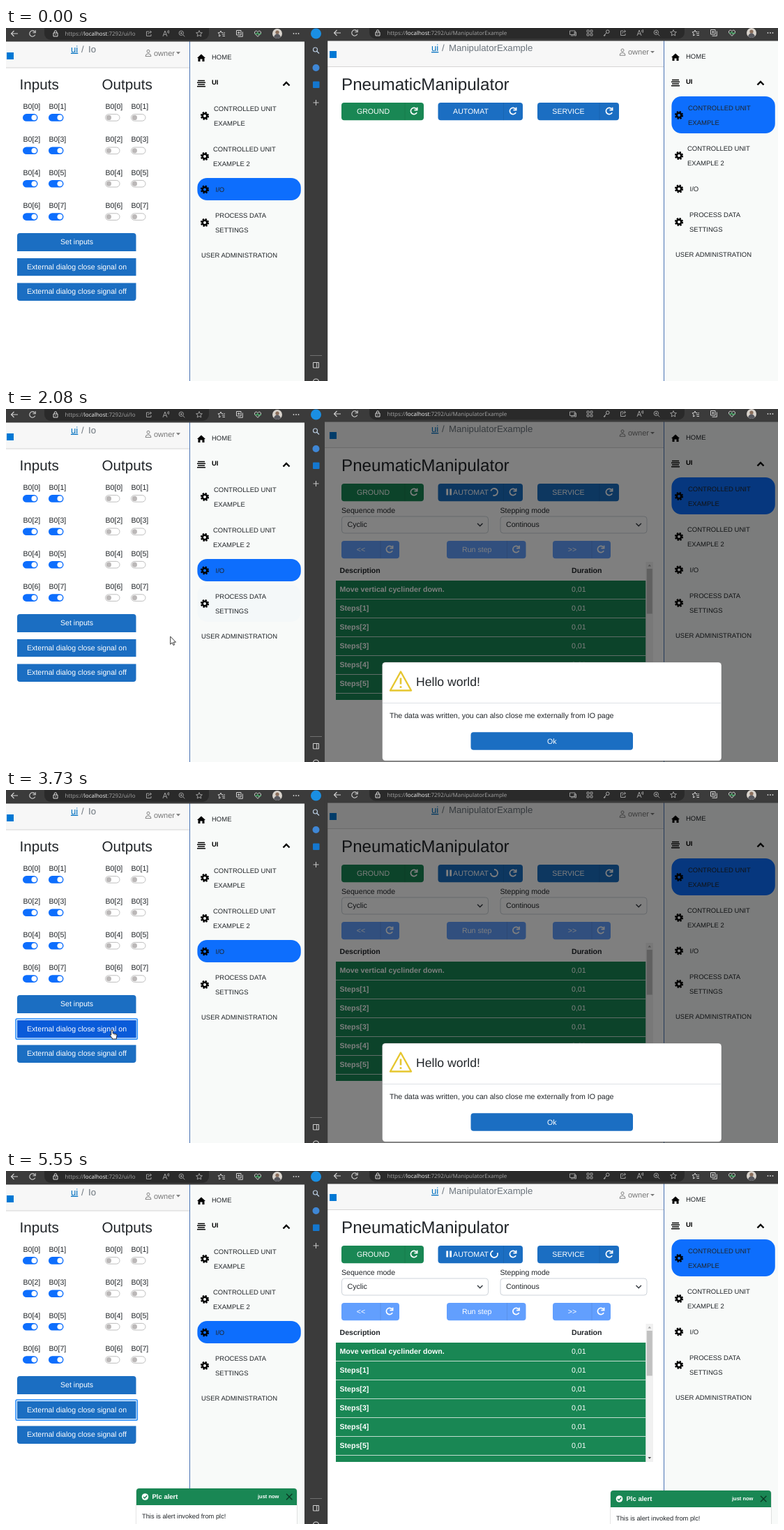
Animation of 1107 by 506 pixels, one loop 5610 ms. Source, as an HTML page:

```html
<!DOCTYPE html>
<html lang="en">
<head>
<meta charset="utf-8">
<title>Manipulator demo</title>
<style>
html, body { margin: 0; width: 100%; height: 100%; overflow: hidden; background: #fff; }
svg { display: block; width: 100vw; height: 100vh; font-family: "Liberation Sans", Arial, sans-serif; text-rendering: geometricPrecision; }
text { white-space: pre; }
.url { font-family: "Open Sans", sans-serif; }
</style>
</head>
<body>
<svg id="stage" viewBox="0 0 1107 506"></svg>
<script>
const LOOP = 5610;
const BLUE = '#1b6ec2', HOVER = '#0a5bd9', ACTIVE = '#0d6efd', PALE = '#629ffe', GREEN = '#198754', INK = '#212529', CHROME = '#3b3b3b';

// Drawing helpers
const rect = (x, y, w, h, fill, r = 0, more = '') =>
  `<rect x="${x}" y="${y}" width="${w}" height="${h}" rx="${r}" fill="${fill}" ${more}/>`;
const circle = (x, y, r, fill, more = '') => `<circle cx="${x}" cy="${y}" r="${r}" fill="${fill}" ${more}/>`;
const line = (d, color, w = 1, more = '') => `<path d="${d}" fill="none" stroke="${color}" stroke-width="${w}" ${more}/>`;
const fill = (d, color, more = '') => `<path d="${d}" fill="${color}" ${more}/>`;
const text = (x, y, s, size = 10.6, color = INK, more = '') =>
  `<text x="${x}" y="${y}" font-size="${size}" fill="${color}" ${more}>${s.replace(/</g, '&lt;')}</text>`;
const mid = (x, y, s, color = '#fff') => text(x, y, s, 10.6, color, 'text-anchor="middle"');
const at = (x, y, body) => `<g transform="translate(${x} ${y})">${body}</g>`;
const group = (id, body) => `<g id="${id}">${body}</g>`;
const BOLD = 'font-weight="700"';

const refresh = (x, y, r, color, w) => at(x, y,
  line(`M${r * .82} ${-r * .57}A${r} ${r} 0 1 0 ${r * .9} ${r * .44}`, color, w) +
  line(`M${r} ${-r * 1.15}V${-r * .3}H${r * .1}`, color, w));

// Browser icons, each around 0,0
const grey = '#d2d2d2', dim = '#a9a9a9';
const star = 'M0-4.4L1.3-1.4 4.4-1.2 2 .9 2.8 4 0 2.4-2.8 4-2 .9-4.4-1.2-1.3-1.4Z';
const icons = {
  back: line('M5 0H-4.5M-.5-4L-4.5 0-.5 4', grey, 1.1),
  reload: refresh(0, 0, 4.2, grey, 1.1),
  lock: line('M-3-1H3V4H-3ZM-1.7-1V-2.5A1.7 1.7 0 0 1 1.7-2.5V-1', '#ddd') + circle(0, 1.5, .7, '#ddd'),
  share: line('M0-3H-3.5V3.5H3V1M-1 1C-1-1 0-2.3 3-2.3M1.5-4L3.6-2.3 1.5-.5', dim, .9),
  read: line('M-4 4L-1-4 2 4M-3 1.3H1M2.5-4Q3.5-2.5 2.5-1M4-5Q5.5-2.5 4 0', dim, .9),
  zoom: circle(-.7, -.7, 3.2, 'none', `stroke="${dim}" stroke-width=".9"`) + line('M1.7 1.7L4.3 4.3M-2.2-.7H.8M-.7-2.2V.8', dim, .9),
  star: line(star, dim, .9),
  faves: line('M-1-4L0-1.5 2.5-1.3M-1-4L-2.2-1.5-5-1.1-3 .9-3.5 4-1 2.6M.8 1H5M1.5 3.5H5M3.5-1.3H5', grey),
  collect: line('M-4.5-4.5H2V2H-4.5ZM4.3-2.5V4.3H-2.5M-1.2-3V.5M-3-1.2H.6', grey),
  heart: line('M0 4.4L-4 .3C-6-3.2-1.8-5.4 0-2.4 1.8-5.4 6-3.2 4 .3Z', grey) + line('M-4 .3H-1.5L-.3-1.5 1 1.5 2 .3H5', '#4caf6b', 1.2),
  dots: [-3.5, 0, 3.5].map(x => circle(x, 0, .9, grey)).join(''),
  user: circle(0, 0, 7, '#d9d4cd') + circle(0, -1.8, 2.6, '#8b6f5c') + fill('M-4.8 5A4.8 4.4 0 0 1 4.8 5 7 7 0 0 1-4.8 5Z', '#57585e'),
  device: line('M-4.5-3H3V2.5H-4.5ZM-3 4H1M2-1H4.5V4H2Z', dim, .9),
  grid: line('M-4-4H-1V-1H-4ZM1-4H4V-1H1ZM-4 1H-1V4H-4ZM1 1H4V4H1Z', dim, .9),
  key: circle(1.8, -1.8, 2.3, 'none', `stroke="${dim}"`) + line('M.2-.2L-4 4H-2V2.5', dim)
};
const toolbar = (y, list) => list.split(' ').map(s => {
  const [name, x] = s.split(':');
  return at(x, y, icons[name]);
}).join('');
const url = (x, y, page) =>
  `<text class="url" x="${x}" y="${y}" font-size="8" fill="#a4a4a4">https://<tspan fill="#f4f4f4">localhost</tspan>:7292/ui/${page}</text>`;

// Page parts
function crumbs(x, y, page) {
  return text(x, y, 'ui', 13.2, '#0071c1', 'text-decoration="underline"') +
    text(x + 15, y, '/', 13.2, '#6c757d') + text(x + 25, y, page, 13.2, '#6c757d');
}
function account(x, y) {
  return circle(x + 4, y - 6.5, 2, 'none', 'stroke="#777" stroke-width=".9"') +
    line(`M${x} ${y + .8}Q${x} ${y - 3} ${x + 4} ${y - 3}T${x + 8} ${y + .8}Z`, '#777', .9) +
    text(x + 12, y, 'owner', 11, '#777') + fill(`M${x + 44} ${y - 5.5}h6l-3 3.2z`, '#777');
}
const gear = y => at(285, y, circle(0, 0, 3.3, 'none', 'stroke="#000" stroke-width="2.6"') +
  circle(0, 0, 5, 'none', 'stroke="#000" stroke-width="2.2" stroke-dasharray="2.3 1.627"'));

function sidebar(top, height, hoverId) {
  const items = [[295, 45, 'HOME'], [298, 118.5, 'CONTROLLED UNIT'], [298, 139.5, 'EXAMPLE'],
    [297, 177, 'CONTROLLED UNIT'], [297, 198, 'EXAMPLE 2'], [300.5, 234.5, 'I/O'],
    [300, 271.5, 'PROCESS DATA'], [300, 292.5, 'SETTINGS'], [280, 329, 'USER ADMINISTRATION']];
  return rect(263, 19, 165, 490, '#f8faf9') + rect(263, 19, 1, 490, '#4a74b4') +
    rect(274.4, top, 148.4, height, ACTIVE, 14) +
    rect(274.4, 252, 148.4, 53, ACTIVE, 14, `id="${hoverId}" opacity="0"`) +
    fill('M280 37.5L286 43H284.5V48H281.5V44.5H278.5V48H275.5V43H274Z', '#000') +
    line('M275 75.5H285M274 78.2H286M275 81H285M274 83.8H286', '#000', 1.4) +
    text(295, 81.2, 'UI', 9.5, '#000', BOLD) + line('M397.5 82.5L402 78 406.5 82.5', '#000', 2.4) +
    [126, 184, 231.5, 279].map(gear).join('') +
    items.map(([x, y, s]) => text(x, y, s, 9.5)).join('');
}
function toggle(x, y, on) {
  return on ? rect(x, y - 5.3, 21.5, 10.6, ACTIVE, 5.3) + circle(x + 16.3, y, 3.8, '#fff')
    : rect(x + .5, y - 4.8, 20.5, 9.6, '#fff', 4.8, 'stroke="#bfbfbf"') + circle(x + 5.4, y, 3.6, '#bbb8b8');
}
function ioPoints() {
  let out = '';
  for (let bit = 0; bit < 8; bit++) {
    const y = 128.4 + 47.4 * (bit >> 1);
    [24, 142].forEach((left, side) => {
      const x = left + 37 * (bit % 2);
      out += text(x + .5, y - 12.4, `B0[${bit}]`) + toggle(x, y, side === 0);
    });
  }
  return out;
}
function splitButton(x, w, y, split, label, color, id) {
  const hover = id ? fill(`M${split} ${y}H${x + 4}q-4 0-4 4v17.2q0 4 4 4H${split}Z`, HOVER, `id="${id}"`) : '';
  return rect(x, y, w, 25.2, color, 4) + hover + rect(split - .5, y, 1, 25.2, '#000', 0, 'opacity=".08"') +
    mid((x + split) / 2, y + 16, label) + refresh(x + w - 14, y + 12, 4.6, '#fff', 1.7);
}
function select(x, label, value) {
  return text(x, 148.7, label) + rect(x + .5, 154, 210, 24, '#fff', 4, 'stroke="#ced4da"') +
    text(x + 8.5, 169, value) + line(`M${x + 195} 164l3.7 3.7 3.7-3.7`, '#343a40', 1.4);
}
function stepTable() {
  let rows = '';
  for (let i = 0; i < 6; i++) {
    const y = 246 + 27 * i;
    rows += rect(473, y + 26, 444.5, 1, '#c2dccf') +
      text(478.5, y + 16.2, i ? `Steps[${i}]` : 'Move vertical cyclinder down.', 10.6, '#fff', BOLD) +
      text(811, y + 16.2, '0,01', 10.6, '#fff');
  }
  return text(478.5, 234.8, 'Description', 10.6, INK, BOLD) + text(811, 234.8, 'Duration', 10.6, INK, BOLD) +
    rect(473, 246, 444.5, 171, GREEN) + rows +
    rect(917.5, 219, 10.5, 198, '#f1f1f1') + rect(918.8, 229, 8, 64.5, '#c1c1c1') +
    fill('M920.5 225.5h4.6l-2.3-2.7z', '#a3a3a3') + fill('M920.5 410h4.6l-2.3 2.7z', '#505050');
}
function modal() {
  return rect(539.5, 363, 486.5, 141.3, '#fff', 4.5, 'stroke="#666" stroke-opacity=".6" stroke-width=".6"') +
    rect(540, 421, 485.5, 1, '#dee2e6') +
    line('M566 376.5L581 403.5H551Z', '#e6c62f', 2.4, 'stroke-linejoin="round"') +
    line('M566 385.5V394.5', '#e6c62f', 2.6) + circle(566, 398.6, 1.5, '#e6c62f') +
    text(588, 397.4, 'Hello world!', 17.6) +
    text(550, 442.6, 'The data was written, you can also close me externally from IO page') +
    rect(666.5, 463.3, 232.5, 25.4, BLUE, 4) + mid(782.7, 479.5, 'Ok');
}
function toast() {
  return rect(186, 454.5, 232, 60, '#000', 5, 'opacity=".1"') +
    rect(187, 455, 230, 60, '#fff', 4) + fill('M187 479V459q0-4 4-4H413q4 0 4 4V479Z', GREEN) +
    circle(199.5, 467, 4.8, '#fff') + line('M197 467l1.9 1.9 3.3-3.6', GREEN, 1.4) +
    text(209.5, 470.3, 'Plc alert', 9.5, '#fff', BOLD) + text(361, 468.6, 'just now', 7.5, '#fff', BOLD) +
    line('M402 462.8l8.4 8.4M410.4 462.8l-8.4 8.4', '#0b3a25', 1.3) +
    text(195, 497.9, 'This is alert invoked from plc!', 9.3);
}

const offShape = 'M16 365.5H186.5V387q0 4-4 4H20q-4 0-4-4Z';
const leftWindow =
  rect(0, 20, 263, 37, '#f7f7f7') + rect(0, 56.5, 263, 1, '#d6d5d5') + rect(1, 35, 10, 10, '#0078d4') +
  crumbs(93, 34.7, 'Io') + account(200, 39.8) +
  text(19.5, 88.3, 'Inputs', 20.7) + text(137.5, 88.3, 'Outputs', 20.7) + ioPoints() +
  fill('M16 320V298q0-4 4-4H182.5q4 0 4 4V320Z', BLUE) +
  group('ring', rect(13.4, 327.2, 175.7, 30.8, '#258cfb', 2) + rect(15, 328.8, 172.5, 27.6, '#fff')) +
  rect(16, 330, 170.5, 25.2, BLUE) + rect(16, 330, 170.5, 25.2, HOVER, 0, 'id="onHover"') +
  fill(offShape, BLUE) + fill(offShape, HOVER, 'id="offHover"') +
  mid(101.5, 310.3, 'Set inputs') + mid(101.5, 345.6, 'External dialog close signal on') +
  mid(101.5, 381, 'External dialog close signal off') +
  sidebar(215, 32, 'leftHover') +
  rect(0, 0, 428, 19.5, CHROME) + rect(55, -8, 236, 25, '#2a2a2a', 9) + url(84.5, 11, 'Io') +
  toolbar(8, 'back:12 reload:38 lock:71 share:205 read:229 zoom:252 star:277 faves:309 collect:335 heart:361 user:389 dots:416');

const rightWindow =
  rect(457, 18, 650, 488, '#fff') + rect(457, 18, 487, 37.5, '#f7f7f7') + rect(457, 55, 487, 1, '#d6d5d5') +
  rect(464, 33, 10, 10, '#0078d4') + crumbs(610, 33, 'ManipulatorExample') + account(880, 38.4) +
  text(481, 89.2, 'PneumaticManipulator', 24.2) +
  splitButton(481, 118, 107, 572, 'GROUND', GREEN) +
  splitButton(619.5, 121.5, 107, 713.5, 'AUTOMAT', BLUE, 'autoHover') +
  splitButton(762, 117, 107, 851, 'SERVICE', BLUE) +
  group('panel',
    rect(631.3, 114.5, 2.8, 9, '#fff') + rect(636.2, 114.5, 2.8, 9, '#fff') +
    at(700, 119, group('spinner', line('M3.54 3.54A5 5 0 1 1 3.54-3.54', '#fff', 1.9))) +
    select(481, 'Sequence mode', 'Cyclic') + select(708.5, 'Stepping mode', 'Continous') +
    splitButton(481, 83, 189, 537, '<<', PALE) + splitButton(632, 113.5, 189, 718.5, 'Run step', PALE) +
    splitButton(784, 83, 189, 840, '>>', PALE) + stepTable()) +
  at(680, -1, sidebar(99, 53, 'rightHover')) +
  rect(457, 18, 650, 488, '#000', 0, 'id="shade"') + group('modal', modal()) +
  rect(457, 0, 650, 18.5, CHROME) + rect(521, -8, 452, 23.5, '#2a2a2a', 9) + url(546.5, 10, 'ManipulatorExample') +
  toolbar(7, 'back:475 reload:500 lock:533 device:813 grid:837 key:861 share:885 read:909 zoom:933 star:957 faves:989 collect:1015 heart:1041 user:1069 dots:1096');

const strip =
  rect(428, 0, 29, 506, CHROME) + rect(456.5, 0, 4.7, 506, CHROME, 0, 'id="edge"') +
  circle(444.5, 8, 7.5, '#1a8fe3') +
  circle(443.5, 31, 3, 'none', 'stroke="#b9cbe0" stroke-width="1.2"') + line('M445.7 33.2L449 36.5', '#b9cbe0', 1.3) +
  circle(444.5, 57, 5, '#3f87d6') + rect(440, 76.5, 9.5, 9.5, '#1477cf', 1) +
  line('M440.5 107H448.5M444.5 103V111', '#c8c8c8') + line('M436 469.5H453', '#707070') +
  line('M440.5 479.5H448.5V487H440.5ZM445.7 479.5V487', '#d0d0d0') +
  circle(444.5, 507, 4, 'none', 'stroke="#d0d0d0" stroke-width="1.2"');

const outline = 'stroke="#222" stroke-width=".9" stroke-linejoin="round"';
const pointer =
  group('arrow', fill('M0 0V11.2L2.6 8.8 4.3 12.5 6 11.7 4.4 8.1H7.8Z', '#fff', outline)) +
  group('hand', fill('M-1.2 .7Q0-.9 1.2 .7V5L3.3 5.2 5.8 5.9Q7.3 6.3 7.1 8L6.3 11V13H.3V11.5L-3 7.8Q-3.2 6.3-1.2 7.3Z', '#fff', outline) +
    line('M3.2 5.5V7.5M5.2 6V7.9', '#444', .7));

document.getElementById('stage').innerHTML = rect(0, 0, 1107, 506, '#fff') + leftWindow + rightWindow + strip +
  group('toasts', toast() + at(680, 3, toast())) + group('pointer', pointer);

// Motion: [time, value...] steps, linear in between
const tracks = {
  pointer: [[180, 916, 370], [400, 800, 262], [600, 690, 168], [730, 630, 130], [800, 641, 122], [900, 650, 120],
    [1600, 650, 120], [1750, 545, 195], [1860, 400, 260], [1950, 302, 296], [2080, 236, 326], [2250, 190, 342],
    [2400, 156, 340], [2580, 150, 348], [2690, 148, 366], [2950, 147, 372], [3120, 151, 346], [3320, 152, 344],
    [3850, 152, 344], [3950, 230, 342], [4020, 564, 327], [4085, 902, 292], [4150, 1010, 284], [4220, 1052, 446.5],
    [4400, 1040, 462], [4570, 975, 482], [4640, 944, 494], [4720, 930, 512]],
  autoHover: [[740, 0], [860, 1], [1620, 1], [1760, 0]],
  leftHover: [[1930, 0], [1950, .07], [2000, .15], [2090, 0]],
  rightHover: [[4085, 0], [4160, .75], [4220, .45], [4320, 0]],
  onHover: [[2280, 0], [2400, 1], [2620, 1], [2690, .5], [2770, 0], [3050, 0], [3180, 1], [3900, 1], [4050, 0]],
  offHover: [[2680, 0], [2810, 1], [3050, 1], [3180, 0]],
  shade: [[2000, 0], [2075, .5], [3770, .5], [3900, 0]],
  modal: [[2000, 0], [2075, 1], [3770, 1], [3880, 0]],
  toasts: [[4380, 0], [4520, 1]],
  spinner: [[1650, -54], [4220, 1180], [5610, 1760]]
};
const shown = {
  panel: [[1640, LOOP]],
  ring: [[3480, LOOP]],
  edge: [[0, 1700], [3450, LOOP]],
  pointer: [[180, 4720]],
  hand: [[740, 1640], [1880, 2000], [2290, 3900], [4110, 4180]]
};
const el = id => document.getElementById(id);
const within = (name, t) => shown[name].some(([a, b]) => t >= a && t < b);

function sample(steps, t) {
  const i = steps.findIndex(s => s[0] > t);
  if (i === 0) return steps[0].slice(1);
  if (i < 0) return steps[steps.length - 1].slice(1);
  const a = steps[i - 1], b = steps[i], k = (t - a[0]) / (b[0] - a[0]);
  return a.slice(1).map((v, n) => v + (b[n + 1] - v) * k);
}
function draw(t) {
  for (const [id, steps] of Object.entries(tracks)) {
    const v = sample(steps, t);
    if (id === 'pointer') el(id).setAttribute('transform', `translate(${v[0]} ${v[1]})`);
    else if (id === 'spinner') el(id).setAttribute('transform', `rotate(${v[0]})`);
    else el(id).setAttribute('opacity', v[0]);
  }
  for (const id in shown) el(id).style.display = within(id, t) ? '' : 'none';
  el('arrow').style.display = within('hand', t) ? 'none' : '';
}
const start = performance.now();
function tick() {
  draw((performance.now() - start) % LOOP);
  requestAnimationFrame(tick);
}
tick();
</script>
</body>
</html>
```
